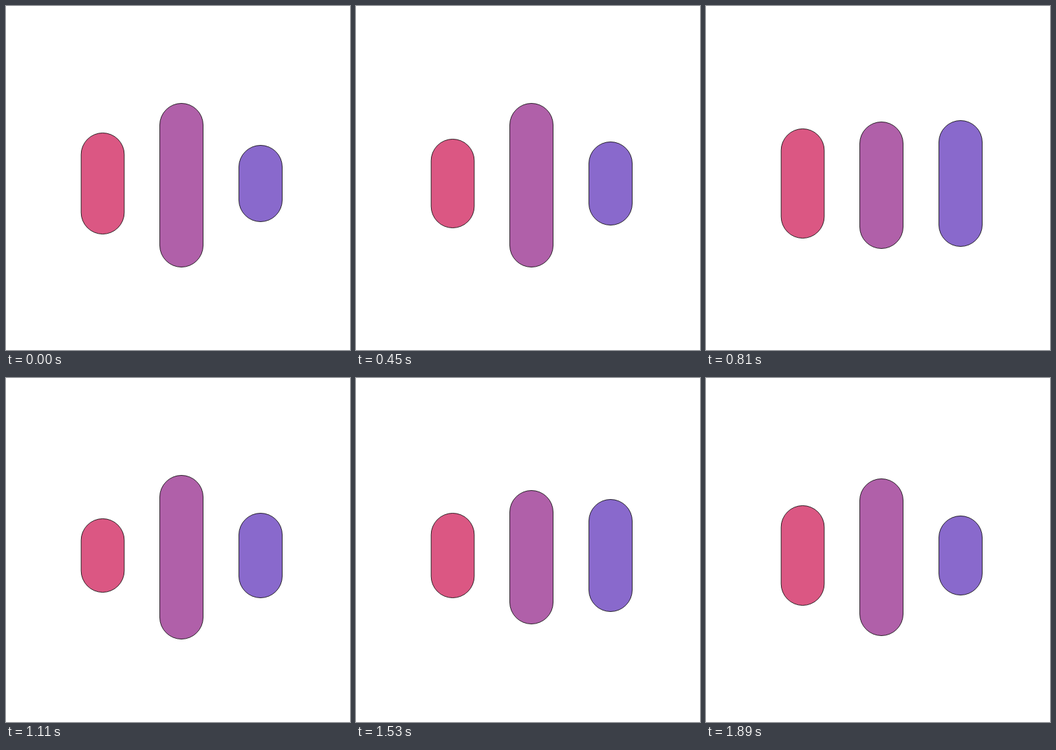
Animation of 500 by 500 pixels, one loop 1.92 s. Source, as an HTML page with a canvas:

```html
<!DOCTYPE html>
<html lang="en">
<head>
<meta charset="utf-8">
<title>Bars</title>
<style>
html, body { margin: 0; width: 100%; height: 100%; overflow: hidden; background: #fff; }
canvas { display: block; }
</style>
</head>
<body>
<canvas id="stage" width="500" height="500"></canvas>
<script>
const ctx = document.getElementById("stage").getContext("2d");
const LOOP = 1920, STEP = 30;

// turns: steps at which a bar changes direction; reach: half its height there.
// The last turn meets the first again at the end of the loop.
const sideTurns = [0, 7, 15, 27, 37, 51];
const bars = [
  { x: 109.2, w: 62.7, mid: 258, color: "#db5783",
    turns: sideTurns, reach: [74, 39, 65, 80, 54, 62] },
  { x: 223.5, w: 63, mid: 260.5, color: "#b060a9",
    turns: [0, 7, 15, 25, 32, 37, 57], reach: [119.5, 75.5, 119.5, 72.5, 141.5, 119.5, 87.5] },
  { x: 338.5, w: 63, mid: 258, color: "#8969cc",
    turns: sideTurns, reach: [56, 77, 61, 92, 62, 82] }
];

const mix = (a, b, p) => a + (b - a) * p;

function reachAt({ turns, reach }, step) {
  const i = turns.findLastIndex(t => t <= step);
  const next = turns[i + 1] ?? LOOP / STEP;
  const p = (step - turns[i]) / (next - turns[i]);
  return mix(reach[i], reach[(i + 1) % reach.length], p);
}

function drawBar(bar, step) {
  // whole-pixel top edge keeps the outline crisp
  const top = Math.round(bar.mid - reachAt(bar, step)) + 0.5;
  ctx.beginPath();
  ctx.roundRect(bar.x, top, bar.w, 2 * (bar.mid - top), bar.w / 2);
  ctx.fillStyle = bar.color;
  ctx.fill();
  ctx.stroke();
}

function draw(time) {
  const step = Math.floor((time % LOOP) / STEP);
  ctx.fillStyle = "#fff";
  ctx.fillRect(0, 0, 500, 500);
  ctx.strokeStyle = "#000";
  ctx.lineWidth = 0.8;
  for (const bar of bars) drawBar(bar, step);
}

const start = performance.now();
function tick() {
  draw(performance.now() - start);
  requestAnimationFrame(tick);
}
tick();
</script>
</body>
</html>
```
